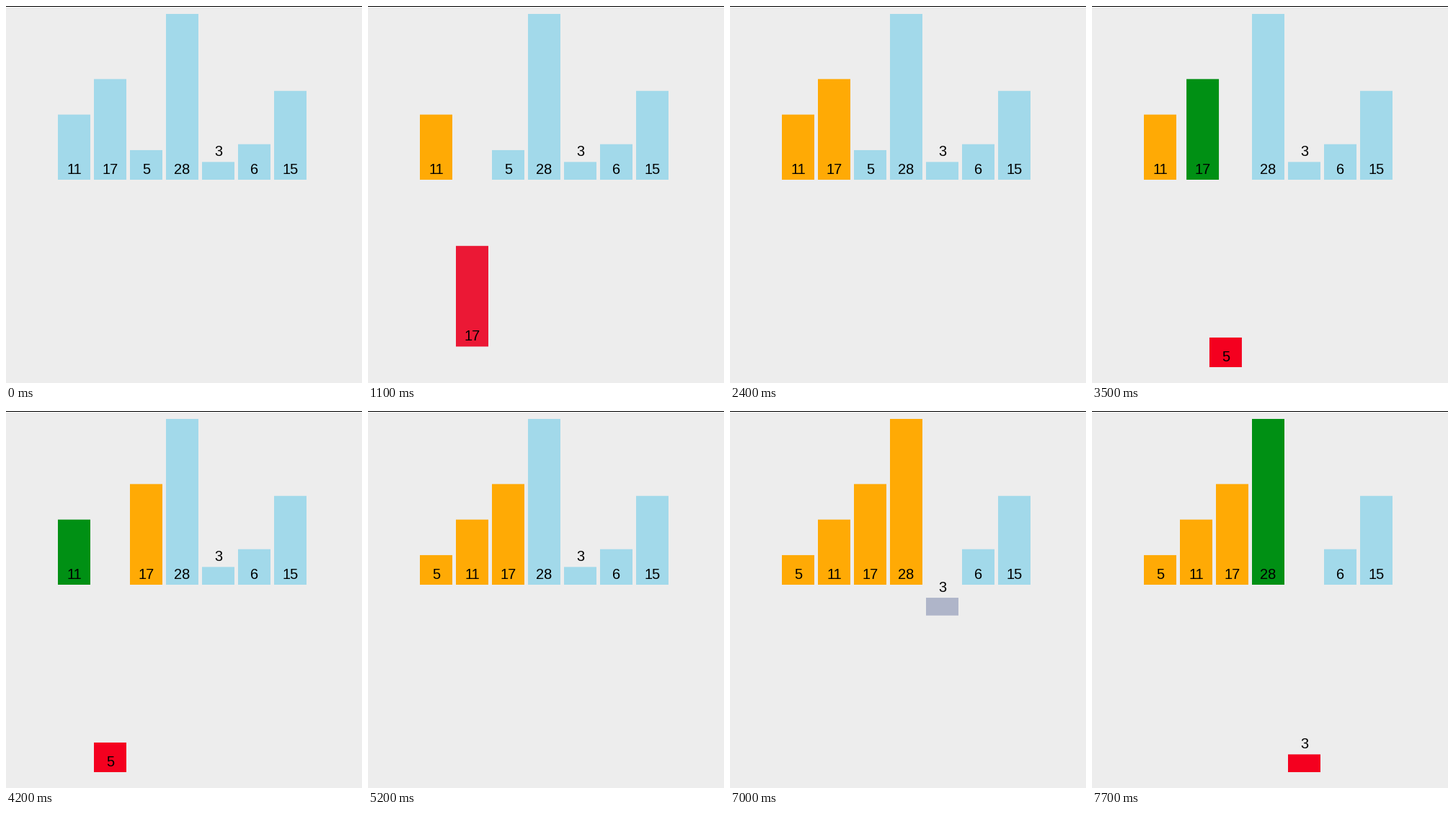
Animation, 494 px wide and 523 px high, one loop 8000 ms. Source, as a matplotlib script:

```python
import matplotlib.pyplot as plt
import numpy as np
from matplotlib.animation import FuncAnimation
from matplotlib.colors import to_rgb
from matplotlib.patches import Rectangle

W, H, DPI = 494, 523, 64
FRAMES, INTERVAL = 80, 100

VALUES = [11, 17, 5, 28, 3, 6, 15]
LEFT, PITCH, BAR_W = 72, 50, 45
BASE, DROP, UNIT = 241, 260, 230 / 28

FIRST, PERIOD, DURATION = 390, 500.5, 300  # ms

BLUE, ORANGE = to_rgb("#a2d9ea"), to_rgb("#ffaa05")
RED, GREEN = to_rgb("#f4001f"), to_rgb("#009014")


def sort_steps(values):
    """Insertion sort as a list of bar states: rows of (x, drop, r, g, b)."""
    state = np.array([(LEFT + PITCH * i, 0, *BLUE) for i in range(len(values))])
    steps = [state.copy()]
    order = list(range(len(values)))

    def paint(bar, color):
        state[bar, 2:] = color

    def save():
        steps.append(state.copy())

    paint(0, ORANGE)
    save()
    for i in range(1, len(values)):
        key, j = order[i], i
        paint(key, RED)
        state[key, 1] = DROP
        save()
        while j > 0:
            other = order[j - 1]
            paint(other, GREEN)
            save()
            if values[other] > values[key]:
                state[[other, key], 0] = state[[key, other], 0]
                order[j - 1], order[j] = key, other
                j -= 1
                save()
                paint(other, ORANGE)
            else:
                paint(other, ORANGE)
                break
        paint(key, ORANGE)
        state[key, 1] = 0
        save()
    return steps


def ease(t):
    t = min(max(t, 0), 1)
    return 4 * t**3 if t < 0.5 else 1 - 4 * (1 - t) ** 3


STEPS = sort_steps(VALUES)


def state_at(ms):
    k = int((ms - FIRST) // PERIOD)
    if k < 0:
        return STEPS[0]
    p = ease((ms - FIRST - k * PERIOD) / DURATION)
    return STEPS[k] + (STEPS[k + 1] - STEPS[k]) * p


fig = plt.figure(figsize=(W / DPI, H / DPI), dpi=DPI, facecolor="#ededed")
ax = fig.add_axes([0, 0, 1, 1])
ax.set_xlim(0, W)
ax.set_ylim(H, 0)
ax.axis("off")
ax.add_patch(Rectangle((0, 0), W, 1, fc="black", lw=0))

bars, labels = [], []
for value in VALUES:
    bar = Rectangle((0, 0), BAR_W, value * UNIT, lw=0, snap=False)
    bars.append(ax.add_patch(bar))
    labels.append(ax.text(0, 0, str(value), family="Liberation Sans",
                          size=20 * 72 / DPI, ha="center", va="baseline"))


def draw(frame):
    for bar, label, (x, drop, *rgb) in zip(bars, labels, state_at(frame * INTERVAL)):
        bottom = BASE + drop
        height = bar.get_height()
        bar.set_xy((x, bottom - height))
        bar.set_facecolor(np.clip(rgb, 0, 1))
        # Short bars carry their label on top.
        y = bottom - 8 if height > 30 else bottom - height - 8
        label.set_position((x + BAR_W / 2, y))
    return bars + labels


anim = FuncAnimation(fig, draw, frames=FRAMES, interval=INTERVAL,
                     repeat=True, repeat_delay=0)
plt.show()
```
